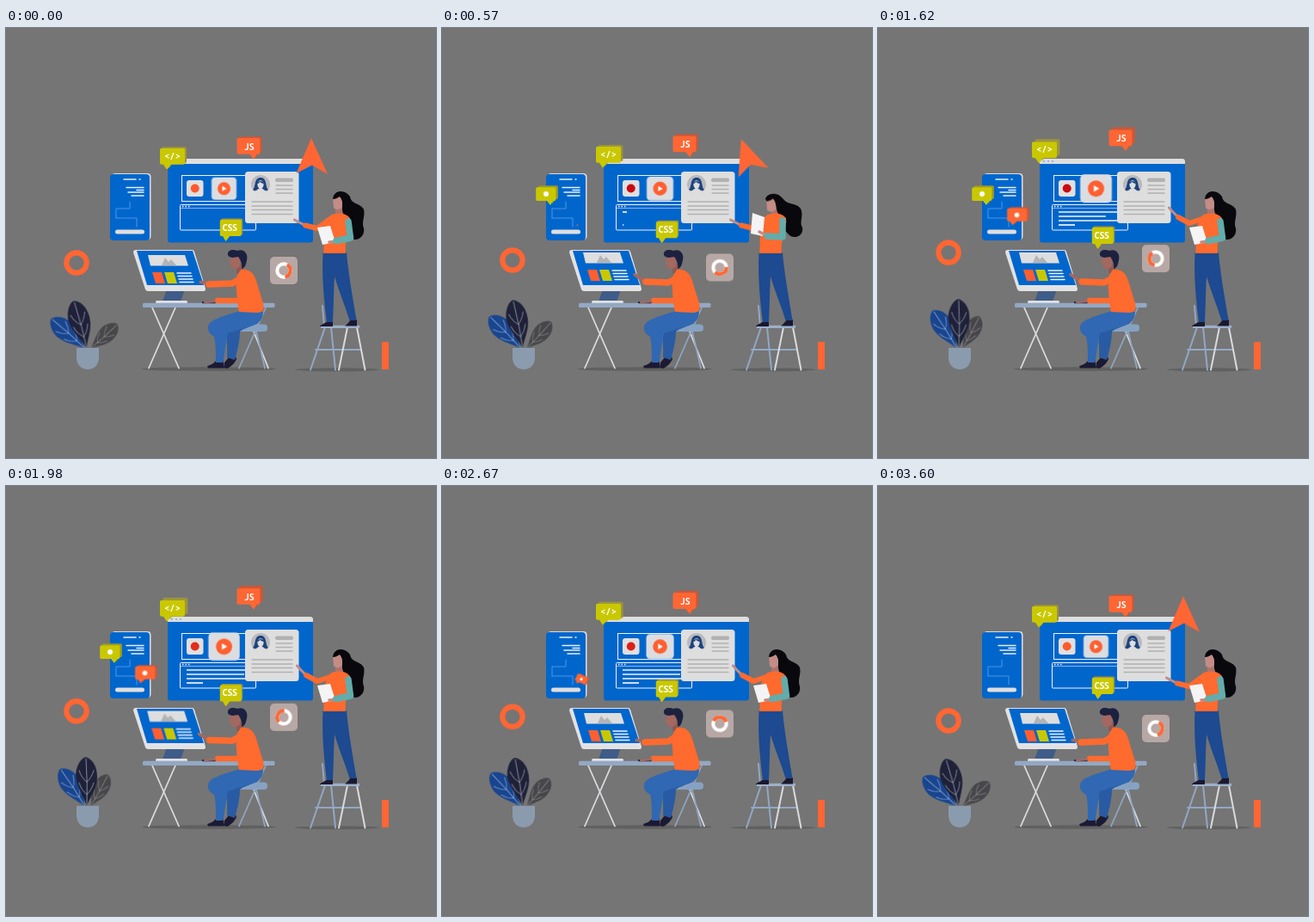
Recreate the animation shown at these times as an HTML page. Size 500 by 500 pixels, loop 3.63 s.

```html
<!DOCTYPE html>
<html lang="en">
<head>
<meta charset="utf-8">
<title>Web team at work</title>
<style>
html, body { margin: 0; width: 100%; height: 100%; overflow: hidden; background: #757575; }
svg { display: block; width: 100%; height: 100%; }
text { font: 600 10.5px "Noto Sans Mono", "DejaVu Sans Mono", monospace; letter-spacing: -.6px; fill: #fff; text-anchor: middle; }

.float, .leaf, .grow, .spin, .dot, .arrow, .pop, .type, .scroll, .lean, .nod, .reach, .poke, .slide {
  animation: 3.63s cubic-bezier(.37, 0, .63, 1) infinite;
}
.line { fill: none; stroke-linecap: round; stroke-linejoin: round; }

.float { animation-name: float; }
@keyframes float { 0%, 94%, 100% { transform: none; } 47% { transform: translateY(var(--y)); } }
.slide { animation-name: slide; }
@keyframes slide { 0%, 94%, 100% { transform: translate(2px, -1.5px); } 47% { transform: translate(3.5px, -3px); } }
.leaf { animation-name: leaf; }
@keyframes leaf { 0%, 94%, 100% { transform: rotate(var(--a)); } 47% { transform: rotate(var(--b)); } }
.grow { animation-name: grow; }
@keyframes grow { 0%, 94%, 100% { transform: none; } 47% { transform: scale(1.27); } }
.spin { animation-name: spin; animation-timing-function: linear; }
@keyframes spin { to { transform: rotate(360deg); } }
.dot { animation-name: dot; }
@keyframes dot { 0%, 4%, 62%, 66%, 98%, 100% { fill: #ff592c; } 14%, 48%, 78%, 86% { fill: #cb0a12; } }

.arrow { animation-name: arrow; }
@keyframes arrow {
  0%, 2%, 95%, 100% { transform: none; opacity: 1; }
  15.5% { transform: rotate(-19deg); opacity: 1; }
  25% { transform: none; opacity: 1; animation-timing-function: linear; }
  29.75% { transform: translateY(-15px); opacity: 1; animation-timing-function: linear; }
  36% { transform: translateY(-60px); opacity: 0; animation-timing-function: step-end; }
  85% { transform: scale(.5); opacity: 0; }
}

.first { animation-name: first; }
@keyframes first {
  0%, 5%, 67%, 100% { transform: scale(0) rotate(60deg); }
  15%, 59% { transform: none; }
}
.second { animation-name: second; }
@keyframes second {
  0%, 14%, 79%, 100% { transform: scale(0) rotate(60deg); }
  24%, 69% { transform: none; }
}

.type { stroke-dasharray: 1 2; animation-name: type; animation-timing-function: linear; }
@keyframes type {
  0%, 14% { stroke-dashoffset: 1; opacity: 1; }
  38%, 76% { stroke-dashoffset: 0; opacity: 1; }
  88%, 100% { stroke-dashoffset: 0; opacity: 0; }
}

.scroll { animation-name: scroll; }
@keyframes scroll { 0%, 72%, 100% { transform: none; } 13%, 47% { transform: translate(-1px, -3px); } }
.poke { d: var(--a); animation-name: poke; }
@keyframes poke { 0%, 72%, 100% { d: var(--a); } 13%, 47% { d: var(--b); } }
.reach { d: var(--a); animation-name: reach; }
@keyframes reach { 0%, 30%, 97%, 100% { d: var(--a); } 43%, 80% { d: var(--b); } }
.lean { d: var(--a); animation-name: lean; }
@keyframes lean { 0%, 2%, 27%, 100% { d: var(--a); } 14%, 17% { d: var(--b); } }
.nod { animation-name: nod; }
@keyframes nod { 0%, 2%, 27%, 100% { transform: none; } 14%, 17% { transform: translate(-3px, 2.5px); } }
</style>
</head>
<body>
<svg viewBox="0 0 500 500">
<defs>
  <path id="bubble" d="M-6-25H19a2 2 0 0 1 2 2V-8a2 2 0 0 1-2 2H5L0 0-4-6H-6a2 2 0 0 1-2-2V-23a2 2 0 0 1 2-2Z"/>
  <path id="leaf" d="M0 0C-3-11-12-21-13-36C-12-49-5-56-1-56C6-54 12-46 12-34C12-20 3-11 0 0Z"/>
  <path id="veins" class="line" stroke-width=".7" d="M0 0Q1-26-1-54M0-14Q-6-18-9-27M0-14Q5-18 8-27M0-28Q-6-32-9-41M0-28Q5-32 8-41"/>
</defs>

<g fill="#606060">
  <ellipse cx="236" cy="396.5" rx="78" ry="2.3"/>
  <ellipse cx="385" cy="397.3" rx="49" ry="2"/>
</g>
<rect x="437" y="365" width="8" height="32" fill="#ff6633"/>
<g class="float" style="--y:-12px"><circle cx="82" cy="273" r="11.7" fill="none" stroke="#ff6633" stroke-width="6.2"/></g>

<!-- plant -->
<g transform="translate(98 373)"><g class="leaf" style="--a:49deg;--b:29deg"><g transform="scale(.76)">
  <use href="#leaf" fill="#47464a"/><use href="#veins" stroke="#aaa6a6"/></g></g></g>
<g transform="translate(92 373)"><g class="leaf" style="--a:-47deg;--b:-31deg"><g transform="scale(.94)">
  <use href="#leaf" fill="#19458f"/><use href="#veins" stroke="#a9c2e6"/></g></g></g>
<g transform="translate(94 373)"><g class="leaf" style="--a:-14deg;--b:1deg"><g transform="scale(1 1.03)">
  <use href="#leaf" fill="#1f2138"/><use href="#veins" stroke="#aab4c6"/></g></g></g>
<path d="M82 372H108V383C108 392 102 397 95 397S82 392 82 383Z" fill="#8b9bae"/>

<!-- phone -->
<rect x="123" y="169" width="45.500" height="77" rx="4" fill="#dedede"/>
<rect x="121" y="170" width="46" height="77" rx="4" fill="#0066cc"/>
<g class="line" stroke="#e8eef8" stroke-width="1.500">
  <path d="M137 176H151M155 176h1M140 185.500H160M152 188.500H160M142 191H160M146 195H160"/>
  <path d="M144 202V210H128V221M128 221H152V231" stroke="#4f94e4" stroke-width="1"/>
</g>
<rect x="127" y="234.500" width="34" height="5" rx="2.500" fill="#dedede"/>

<!-- board -->
<rect x="188" y="152" width="169" height="97.500" rx="3" fill="#0066cc"/>
<path d="M188 158V155a3 3 0 0 1 3-3H354a3 3 0 0 1 3 3V158Z" fill="#dedede"/>
<g fill="#7ea9de"><circle cx="193" cy="155" r="1"/><circle cx="198" cy="155" r="1"/><circle cx="203" cy="155" r="1"/></g>
<g fill="none" stroke="#eef3fb">
  <rect x="204.500" y="171.500" width="88" height="30"/>
  <rect x="202.500" y="205.500" width="88" height="29.500" rx="1"/>
  <path d="M203 209.500H290" stroke-width=".8" opacity=".7"/>
  <path d="M205 207.500h1.500m2 0h1.500m2 0h1.500" stroke-width="1.400"/>
</g>
<g fill="none" stroke="#f2f5fa" stroke-width="1.700">
  <path class="type" pathLength="1" d="M210 214H279"/>
  <path class="type" pathLength="1" d="M210 219H277" style="animation-delay:-3.230s"/>
  <path class="type" pathLength="1" d="M210 224H279" style="animation-delay:-3.430s"/>
  <path class="type" pathLength="1" d="M210 229H229"/>
</g>
<rect x="210" y="177" width="19.500" height="19" rx="3" fill="#e0e0e0"/>
<circle class="dot" cx="219.700" cy="186.500" r="5"/>
<g transform="translate(253.500 186.700)"><g class="grow">
  <rect x="-14.500" y="-13" width="29" height="26" rx="4" fill="#dbdde1"/>
  <circle r="7.500" fill="#ff5f30"/><path d="M-2-3L3 0L-2 3Z" fill="#fff"/>
</g></g>

<!-- profile card -->
<rect x="278" y="167" width="62.500" height="60" rx="3.500" fill="#dedede"/>
<circle cx="296" cy="182" r="11" fill="#b9babd"/>
<path d="M287 188C291 184 288 174 296 174S301 184 305 188C303 190 300 189 299 187H293C292 189 289 190 287 188Z" fill="#1d437f"/>
<path d="M289 191C291 188 294 189 294.500 186H297.500C298 189 301 188 303 191C299 194 293 194 289 191Z" fill="#dedede"/>
<ellipse cx="296" cy="182" rx="3.600" ry="4.800" fill="#dedede"/>
<path d="M292 181C292 177 300 177 300 181C298 181 296 180 295 178.500C295 180 294 181 292 181Z" fill="#1d437f"/>
<rect x="313" y="174.500" width="21" height="4.500" rx="2" fill="#b1b1b1"/>
<path class="line" stroke="#b1b1b1" stroke-width="1.300" d="M314 183H333M314 187.500H333M314 192H333M286 202H333M286 207H333M286 211.500H333M286 216.500H333"/>

<g transform="translate(355 150)"><path class="arrow" d="M0-22L19 20L1 9.500L-17.500 19Z" fill="#ff6633"/></g>

<!-- gauge tile -->
<g class="float" style="--y:-14px">
  <rect x="307" y="266" width="32" height="32" rx="5" fill="#b7a8a5"/>
  <g transform="translate(323 282)"><g class="spin" fill="none" stroke-width="4">
    <circle r="7.700" stroke="#fff"/><path d="M3.800-6.700A7.700 7.700 0 0 1 1.500 7.500" stroke="#ff6633"/>
  </g></g>
</g>

<!-- speech tags -->
<g transform="translate(187 164.700)"><g class="float" style="--y:-7.500px">
  <use class="slide" href="#bubble" fill="#9d943f"/><use href="#bubble" fill="#c9c800"/>
  <text x="6.500" y="-12" style="letter-spacing:0">&lt;/&gt;</text>
</g></g>
<g transform="translate(288 152.700)"><g class="float" style="--y:-9.500px">
  <g class="slide"><use href="#bubble" transform="scale(-.93 1)" fill="#c8583a"/></g>
  <use href="#bubble" transform="scale(-.93 1)" fill="#ff6633"/>
  <text x="-5.500" y="-11">JS</text>
</g></g>
<g transform="translate(255.500 248)"><g class="float" style="--y:9px">
  <use href="#bubble" transform="translate(1.500 -1.500) scale(.87 1)" fill="#9d943f"/>
  <use href="#bubble" transform="scale(.87 1)" fill="#c9c800"/>
  <text x="4.500" y="-12">CSS</text>
</g></g>
<g transform="translate(126 206)"><g class="pop first">
  <use href="#bubble" transform="translate(2.500 -2) scale(-.8 .83)" fill="#9d9a22"/>
  <use href="#bubble" transform="scale(-.8 .83)" fill="#c9c800"/>
  <circle cx="-5" cy="-13" r="3" fill="#fff"/>
</g></g>
<g transform="translate(156.500 229.500)"><g class="pop second">
  <use href="#bubble" transform="translate(2.500 -1.500) scale(.8 .79)" fill="#c8583a"/>
  <use href="#bubble" transform="scale(.8 .79)" fill="#ff6633"/>
  <circle cx="5" cy="-12" r="2.800" fill="#fff"/>
</g></g>

<!-- desk, stool and computer -->
<g class="line" stroke="#d9dadd" stroke-width="1.800">
  <path d="M170 325L201 395.500M197 325L166 395.500M288 353L305 395.500"/>
  <path d="M302 325L271 395.500M291 353L301 395.500" stroke="#8fa5c0"/>
</g>
<rect x="269" y="344.500" width="35" height="8.500" rx="4" fill="#86a2c2"/>
<path d="M187 304H208L203 318H182Z" fill="#3f5c88"/>
<rect x="174" y="317" width="37" height="3.200" rx="1.500" fill="#dfe1e4"/>
<path d="M151 258H217Q218 258 219 260L232 303Q232 306 230 306H165Q163 306 162 304L148 261Q148 258 151 258Z" fill="#e1e2e4"/>
<path d="M152 259H217L230 299H164Z" fill="#0066cc"/>
<g class="scroll">
  <path d="M165 264H208L212 276.500H168Z" fill="#dedede"/>
  <path d="M181 276L185 267L189 272L192 269L198 276Z" fill="#b4b4b6"/>
  <path d="M170 284H181L185 297H174Z" fill="#ff5f30"/>
  <path d="M184 284H195L199 297H188Z" fill="#c9c800"/>
  <path class="line" stroke="#eef3fb" stroke-width="1.500" d="M199 285H215M200 288.500H216M201 292H217M202 295.500H218"/>
</g>
<rect x="159" y="319.700" width="153.500" height="5.300" rx="1.500" fill="#93a8c3"/>
<rect x="228" y="318" width="16" height="2.200" rx="1" fill="#1c2140"/>

<!-- man -->
<path d="M254 389L259 383L267 382L268 385C266 390 261 394 257 396L253 395Z" fill="#1c1a33"/>
<path d="M278 335L290 343C283 349 276 349 272 353C272 364 269 375 266 386L257 383C258 370 256 360 256 350Z" fill="#285ba3"/>
<path d="M234 393C238 392 242 390 244 387H253V395.500H235Z" fill="#1c1a33"/>
<path d="M272 329L299 330C299 341 291 346 280 348L258 355C256 366 254 378 252.500 389H244C244 377 244 366 242 359C237 356 234 352 235 347C237 340 246 337 272 329Z" fill="#3068b3"/>
<path d="M268 274H276V285H268Z" fill="#8f5953"/>
<path d="M273 281C282 280 288 284 291 294L299 320C301 329 298 331 290 331L271 330C268 318 268 300 267 291Z" fill="#ff6a2e"/>
<path d="M261 265H272V277C270 281 263 281 262 278L260 273Z" fill="#a36860"/>
<path d="M258 264C257 258 264 257 269 259C277 256 282 263 280 270C279 275 278 279 274 280C275 275 273 270 270 266C266 267 260 268 258 264Z" fill="#1c2140"/>
<g class="line" stroke="#ff6a2e" stroke-width="7.500">
  <path d="M282 305L276 317L246 317" stroke-width="6.500"/>
  <path d="M243 318L231 319" stroke="#a36860" stroke-width="2.500"/>
  <path class="poke" stroke="#a36860" stroke-width="3.500" style="--a:path('M236 297L231 296L226 295.500');--b:path('M236 294L230 291L224 286.500')"/>
  <path class="poke" style="--a:path('M279 288L263 297L236 298');--b:path('M279 288L263 296L237 295')"/>
</g>

<!-- ladder -->
<g class="line" stroke-width="2">
  <path d="M368 323L370 347M371 348L354 397.500M378 348L383 397.500M360 374H412" stroke="#92a8c5"/>
  <path d="M397 348L387 397.500M408 348L417.500 397.500" stroke="#d8dadd"/>
</g>
<rect x="366" y="345.800" width="45" height="3.200" fill="#9db0ca"/>

<!-- woman -->
<path d="M365 346.500C368 344 372 343 374 341H380V347H365ZM394 346.500C397 344 399 342 401 339H408V346.500Z" fill="#1a1830"/>
<path d="M368.500 261H396C398 285 403 312 407.500 340H399.500C394 322 387 306 382 289C381 305 381 325 380 342H373C370 318 367 290 368.500 261Z" fill="#1d4a90"/>
<path class="lean" fill="#08080d" style="--a:path('M381 196C383 188 395 188 400 196C402 206 412 203 416 211C418 219 413 225 416 233C418 244 405 250 401 243C394 235 395 222 391 212Z');--b:path('M376 199C378 191 391 191 397 199C402 206 412 203 417 210C421 218 415 226 419 232C421 243 408 246 403 240C395 232 392 225 388 214Z')"/>
<path d="M383 206H391V219H383Z" fill="#ad736e"/>
<path d="M377 218C385 214 395 215 400 221C402 232 393 245 395 262H369C371 250 368 240 372 228Z" fill="#ff6a2e"/>
<g class="nod">
  <path d="M380 197C384 196 388 195 391 197V208C389 212 383 212 381 209Z" fill="#c38c86"/>
  <path d="M380 199C380 191 391 187 397 194C401 201 398 210 394 213C391 210 393 202 388 196C385 198 383 199 380 199Z" fill="#08080d"/>
</g>
<g class="line" stroke="#ff6a2e" stroke-width="6">
  <path class="reach" stroke="#c38c86" stroke-width="3" style="--a:path('M347 229L341 226L335.500 223');--b:path('M348 219L342 213L338.500 209')"/>
  <path class="reach" style="--a:path('M377 222L362 233L348 229.500');--b:path('M377 222L362 227L349 220')"/>
</g>
<path class="lean" fill="#f4f4f5" style="--a:path('M362 232L377 230L383 249L368 252Z');--b:path('M361 215L375 220L373 242L359 239Z')"/>
<g class="line" stroke="#63acab" stroke-width="7.500">
  <path class="lean" stroke="#c38c86" stroke-width="3.500" style="--a:path('M387 248L381 248.500L376 249');--b:path('M380 242L374 239.500L369 237')"/>
  <path class="lean" style="--a:path('M398 225L400.500 244L384 247.500');--b:path('M396 224L396 243L378 242')"/>
</g>
</svg>
</body>
</html>
```
